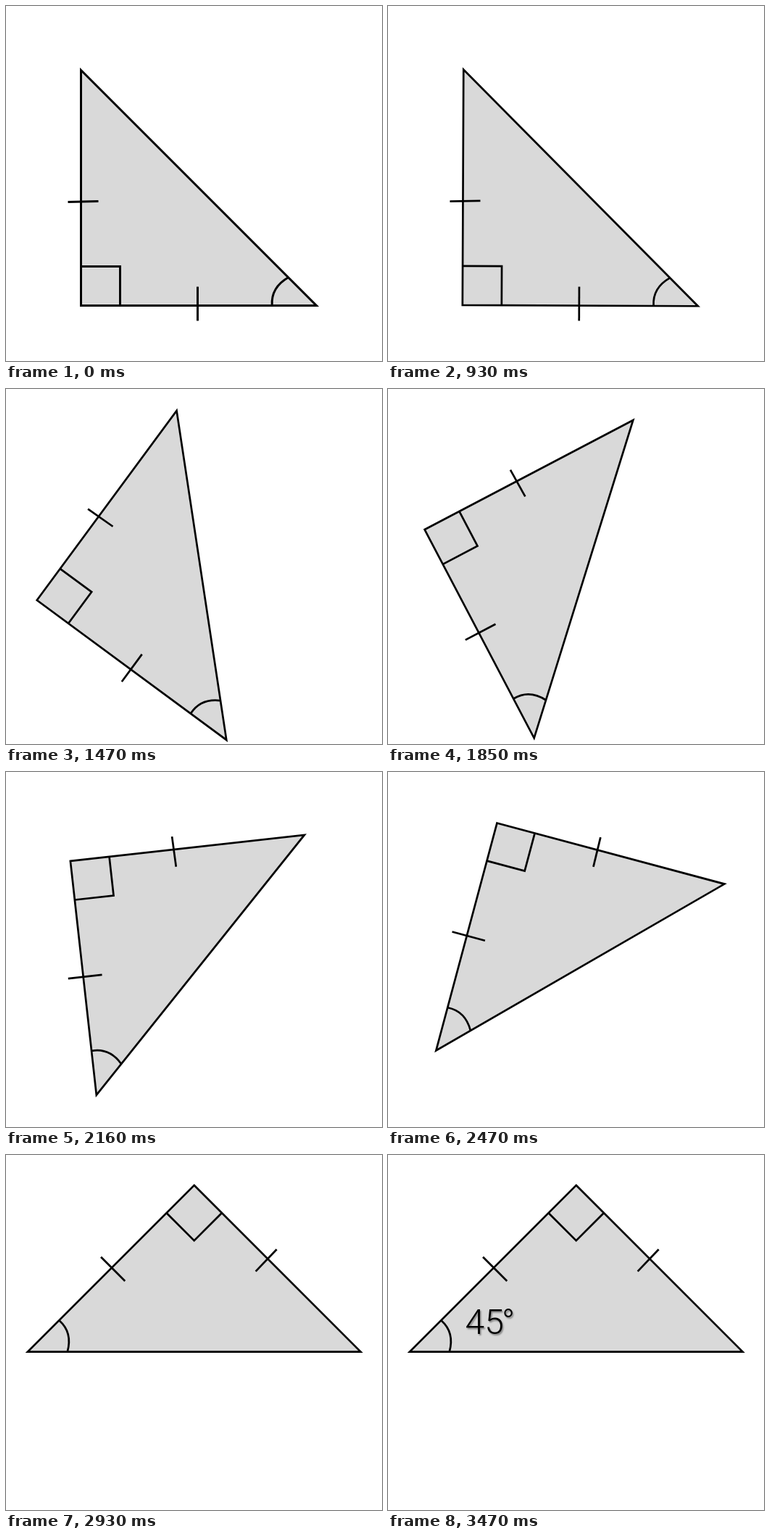
An HTML page with a canvas that plays this animation: 519 px wide and 490 px high, repeating every 5.43 s.

```html
<!DOCTYPE html>
<html lang="en">
<head>
<meta charset="utf-8">
<title>Right isosceles triangle</title>
<style>
  html, body { margin: 0; width: 100%; height: 100%; overflow: hidden; background: #fff; }
  canvas { display: block; width: 519px; height: 490px; }
</style>
</head>
<body>
<canvas id="stage" width="519" height="490"></canvas>
<script>
const ctx = document.getElementById('stage').getContext('2d');
const LOOP = 5430;
const STEPS_PER_MS = 13 / 1000;
const PIVOT = { x: 258.6, y: 260 };

// [step, degrees]: the turn begins with a tiny nudge, then runs almost evenly
const TURN = [[11, 0], [12, 0.25], [19, 36.4], [24, 62.3], [32, 105], [38, 135]];
const LABEL_START = 39;
const LABEL_STEPS = 6;

const clamp01 = v => Math.min(1, Math.max(0, v));

function angleAt(step) {
  if (step <= TURN[0][0]) return 0;
  for (let i = 1; i < TURN.length; i++) {
    const [s0, a0] = TURN[i - 1];
    const [s1, a1] = TURN[i];
    if (step <= s1) return a0 + (a1 - a0) * (step - s0) / (s1 - s0);
  }
  return TURN[TURN.length - 1][1];
}

function tracePath(points) {
  ctx.beginPath();
  points.forEach(([x, y]) => ctx.lineTo(x, y));
}

function strokeLine(...points) {
  tracePath(points);
  ctx.stroke();
}

function drawTriangle(angle) {
  ctx.save();
  ctx.translate(PIVOT.x, PIVOT.y);
  ctx.rotate(angle * Math.PI / 180);
  ctx.translate(-PIVOT.x, -PIVOT.y);

  ctx.fillStyle = '#d9d9d9';
  ctx.strokeStyle = '#000';
  ctx.lineWidth = angle ? 2.7 : 3;
  ctx.lineJoin = 'miter';

  tracePath([[103.5, 413.5], [103.5, 88.5], [428.5, 413.5]]);
  ctx.closePath();
  ctx.fill();
  ctx.stroke();

  // right angle and equal-side ticks
  strokeLine([103.5, 359.5], [157.5, 359.5], [157.5, 413.5]);
  strokeLine([85.5, 270.4], [127.5, 269.4]);
  strokeLine([264.5, 387.5], [264.5, 434.5]);

  // base angle
  ctx.beginPath();
  ctx.moveTo(389.5, 374.8);
  ctx.quadraticCurveTo(365.8, 388.4, 367.2, 413);
  ctx.stroke();
  ctx.restore();
}

function drawLabel(alpha) {
  if (!alpha) return;
  ctx.save();
  ctx.globalAlpha = alpha;
  ctx.font = '300 48px Roboto, "Liberation Sans", sans-serif';
  ctx.fillStyle = '#000';
  ctx.shadowColor = 'rgba(0, 0, 0, 0.4)';
  ctx.shadowBlur = 2;
  ctx.shadowOffsetX = 1.5;
  ctx.shadowOffsetY = 1.5;
  ctx.fillText('45', 106.5, 247);
  ctx.fillText('°', 157, 247);
  ctx.restore();
}

function draw(ms) {
  const step = Math.floor((ms % LOOP) * STEPS_PER_MS);
  ctx.fillStyle = '#fff';
  ctx.fillRect(0, 0, 519, 490);
  drawTriangle(angleAt(step));
  drawLabel(clamp01((step - LABEL_START) / LABEL_STEPS));
}

const start = performance.now();
function tick() {
  draw(performance.now() - start);
  requestAnimationFrame(tick);
}
tick();
</script>
</body>
</html>
```
